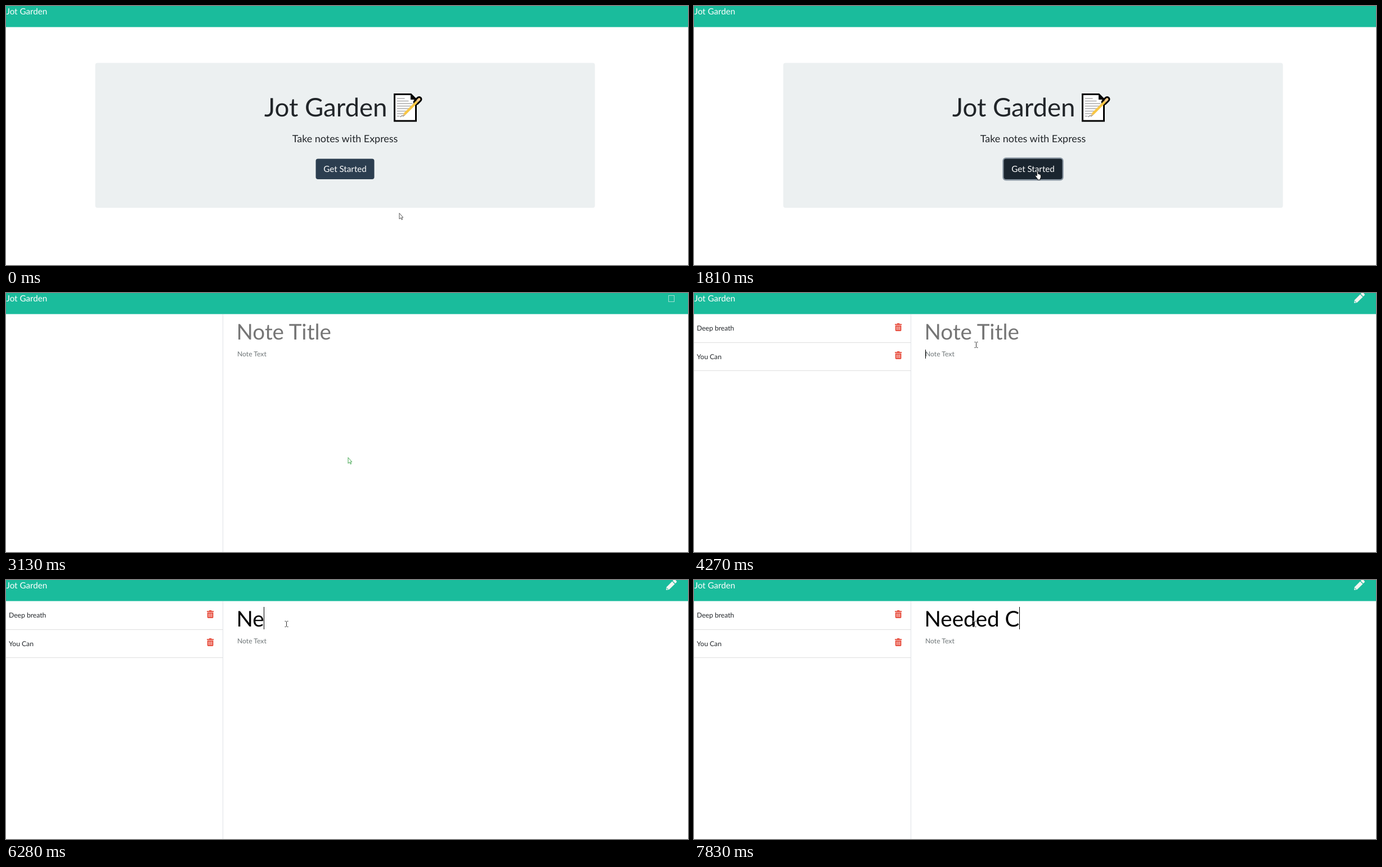
Animation, 1212 px wide and 462 px high, one loop 8000 ms. Source, as an HTML page with a canvas:

```html
<!DOCTYPE html>
<html lang="en">
<head>
<meta charset="utf-8">
<title>Jot Garden</title>
<style>
  html, body { margin: 0; width: 100%; height: 100%; overflow: hidden; background: #fff; }
  canvas { display: block; width: 1212px; height: 462px; }
</style>
</head>
<body>
<canvas id="stage" width="1212" height="462"></canvas>
<script>
const ctx = document.getElementById('stage').getContext('2d');
const LOOP = 8000;
const TITLE_X = 409.5;
const TITLE_SIZE = 38.6;

function text(str, x, y, size, color, align = 'left') {
  ctx.font = `${size}px Lato, sans-serif`;
  ctx.textAlign = align;
  ctx.fillStyle = color;
  ctx.fillText(str, x, y);
}

function rect(x, y, w, h, color) {
  ctx.fillStyle = color;
  ctx.fillRect(x, y, w, h);
}

function box(x, y, w, h, r, color) {
  ctx.fillStyle = color;
  ctx.beginPath();
  ctx.roundRect(x, y, w, h, r);
  ctx.fill();
}

function shape(d, fill, stroke, width = 1) {
  const path = new Path2D(d);
  if (fill) {
    ctx.fillStyle = fill;
    ctx.fill(path);
  }
  if (stroke) {
    ctx.strokeStyle = stroke;
    ctx.lineWidth = width;
    ctx.stroke(path);
  }
}

function at(x, y, draw) {
  ctx.save();
  ctx.translate(x, y);
  draw();
  ctx.restore();
}

// Cursors
function arrow(x, y, line = '#444') {
  at(x, y, () => shape('M.5.5V11L3 8.8 4.7 12.3 6.2 11.6 4.6 8.2H7.2Z', '#fff', line, 0.9));
}

function hand(x, y) {
  at(x, y, () => shape(
    'M3.4 9V2Q3.4.6 4.5.6T5.6 2V5.6Q7 5 7.4 6.2 8.7 5.8 9 6.9 10.5 6.6 10.5 8V11.5L9.3 14V16H4.4V14.3L.8 9.6Q.3 8.2 1.7 8Z',
    '#fff', '#111', 0.9));
}

function beam(x, y) {
  ctx.save();
  ctx.globalCompositeOperation = 'difference';
  at(x, y, () => shape('M.5.5H2.6M4.4.5H6.5M3.5 1V10M.5 10.5H2.6M4.4 10.5H6.5', null, '#ccc'));
  ctx.restore();
}

// Icons
function memo() {
  at(689, 156, () => {
    shape('M1.5 1.5H30.5L39.5 10.5V49H1.5Z', '#fff', '#000', 3);
    shape('M30 1V11H40Z', '#000');
    ctx.lineCap = 'round';
    shape('M6.5 9H19M6.5 13.5H26M6.5 18H33M6.5 22.5H33M6.5 27H29M6.5 31.5H24M6.5 36H19M6.5 40.5H10', null, '#aaa', 1.5);
    shape('M12 41.5Q15 38.5 17 40.5L20 38', null, '#777', 1.2);
    shape('M40 15.5L45.2 10.3', null, '#000', 10.6);
    ctx.lineCap = 'butt';
    shape('M16 40L18.5 34.5 40 13 43 16 21.8 37.5Z', '#f8c644');
    shape('M16 40L18 35.5 20.5 38Z', '#e9c58f');
    ctx.lineCap = 'round';
    shape('M42.6 13L45.2 10.4', null, '#f3c98a', 4.6);
  });
}

function trash(x, y) {
  at(x, y, () => {
    shape('M0 1.2H3.4L4.3 0H7.9L8.8 1.2H12.2V2.9H0ZM.8 3.8H11.4V12.6Q11.4 14 10 14H2.2Q.8 14 .8 12.6Z', '#e74c3c');
    shape('M3.6 5.5V12.2M6.1 5.5V12.2M8.6 5.5V12.2', null, '#fff', 0.9);
  });
}

function pencil() {
  at(1173, -1, () => {
    shape('M10.8 3.5L15.5 8.2 5.5 18 0 19 .9 13.4Z', '#f3f5f1');
    shape('M11.7 2.6L13.7.6Q15-.5 16.3.6L18.4 2.7Q19.5 4 18.4 5.3L16.4 7.3Z', '#f3f5f1');
    shape('M2 15.2V17H3.8', null, '#18bc9c', 0.9);
  });
}

function header() {
  rect(0, 0, 1212, 37.6, '#1abc9c');
  text('Jot Garden', 0.5, 14.5, 15.2, '#fff');
}

function homePage(t) {
  box(158.6, 101.6, 888, 258.4, 4, '#ecf0f1');
  text('Jot Garden', 459, 197, 45.6, '#212529');
  memo();
  text('Take notes with Express', 602.5, 242.6, 17.9, '#212529', 'center');

  const focused = t >= 1310;
  if (focused) box(548.3, 270.3, 108.4, 41.2, 6, t < 1810 ? '#a9b4be' : '#8996a2');
  box(550.5, 272.5, 104, 36.6, 4, t < 820 ? '#2c3e50' : focused ? '#1a252f' : '#1e2b37');
  if (t >= 490 && t < 820) box(550.5, 287, 104, 22.1, [0, 0, 4, 4], '#25343f');
  text('Get Started', 602.5, 296.3, 15.2, '#fff', 'center');

  if (t < 490) arrow(698.5, 369);
  else if (t < 1810) hand(611, 295);
  else if (t < 2290) hand(606, 294);
  else if (t < 2740) hand(604, 292.5);
  else arrow(608, 293, '#1a252f');
}

function noteList() {
  ['Deep breath', 'You Can'].forEach((name, i) => {
    const y = 38 + i * 50.5;
    text(name, 5, y + 29, 12.15, '#212529');
    trash(357, Math.floor(y) + 16);
    rect(0, Math.floor(y + 50), 385, 1, '#dfdfdf');
  });
  pencil();
}

const typing = [[6280, 'Ne'], [6680, 'Nee'], [7060, 'Need'], [7450, 'Needed'], [7830, 'Needed C']];

function editor(t) {
  const step = typing.filter(([start]) => t >= start).pop();
  const typed = step ? step[1] : '';
  text(typed || 'Note Title', TITLE_X, 82.5, TITLE_SIZE, typed ? '#000' : '#757575');
  if (typed || (t >= 5020 && t < 5430)) {
    const end = TITLE_X + ctx.measureText(typed).width;
    rect(Math.max(410, Math.floor(end)), 48, 1, 40, '#000');
  }
  text('Note Text', 411, 113, 12.15, '#6f7678');
  if (t >= 4270 && t < 4650) rect(411, 101, 1, 16, '#000');
}

function notesPage(t) {
  rect(385, 38, 1, 424, '#dee2e6');
  if (t >= 3470) {
    noteList();
  } else {
    ctx.strokeStyle = '#a5e0d3';
    ctx.lineWidth = 1;
    ctx.strokeRect(1177.5, 4.5, 10, 11);
  }
  editor(t);

  if (t < 3470) arrow(607.5, 293, '#2f9e3f');
  else if (t < 3860) beam(557, 193);
  else if (t < 4270) beam(499, 87);
  else if (t < 4650) beam(498, 87);
  else if (t < 5020) beam(497, 75);
  else beam(495, 73);
}

function frame(now) {
  const t = now % LOOP;
  ctx.textRendering = 'geometricPrecision';
  ctx.lineCap = 'butt';
  ctx.lineJoin = 'miter';
  rect(0, 0, 1212, 462, '#fff');
  header();
  if (t < 3130) homePage(t);
  else notesPage(t);
}

const origin = performance.now();
(function tick() {
  frame(performance.now() - origin);
  requestAnimationFrame(tick);
})();
</script>
</body>
</html>
```
